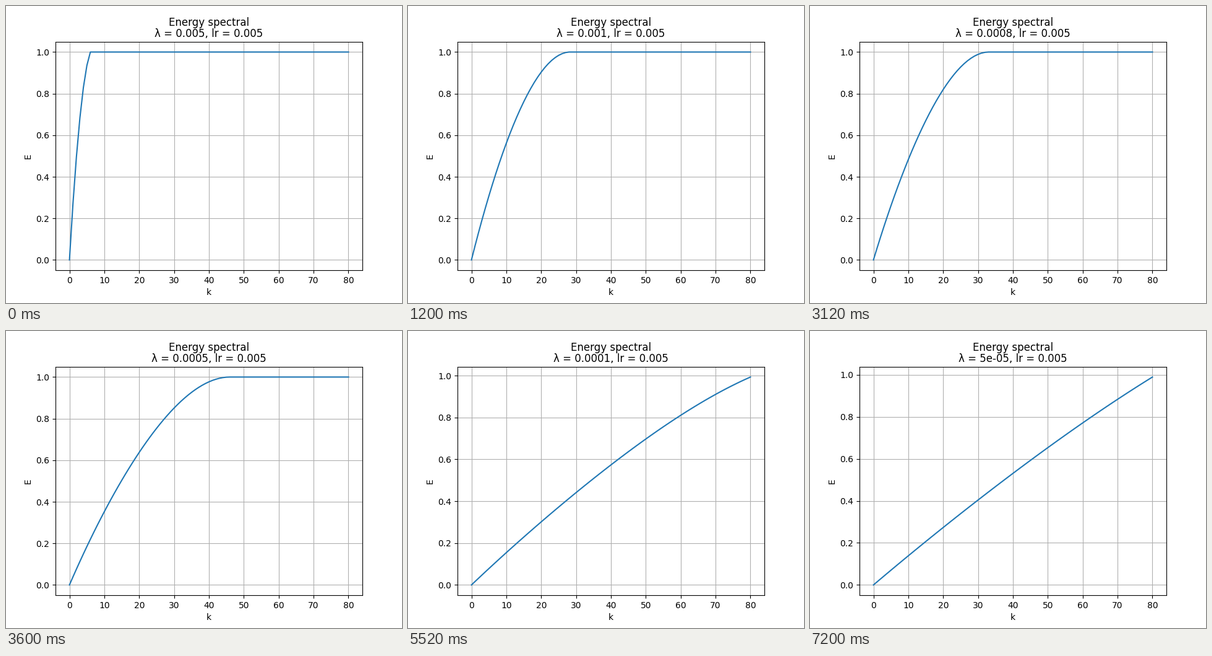
Recreate the animation shown at these times as a matplotlib script. Size 640 px wide and 480 px high, loop 8 s.

```python
import matplotlib.pyplot as plt
import numpy as np
from matplotlib.animation import FuncAnimation

LR = 0.005
TICK_MS = 400
TICKS_PER_CURVE = 3
N_TICKS = 20

# lambda, k where the energy saturates, bend of the rise, late extra bend
CURVES = [
    (0.005, 6, 0.735, 0),
    (0.001, 28, 0.878, 0.095),
    (0.0008, 33, 0.838, 0.155),
    (0.0005, 46, 0.784, 0.215),
    (0.0001, 80.9, 0.282, 0.142),
    (0.00008, 80.93, 0.219, 0.095),
    (0.00005, 81.02, 0.141, 0.034),
]

k = np.arange(81)


def energy(k_sat, bend, late):
    """Straight rise to 1 at k_sat, bowed upwards, then flat."""
    x = np.minimum(k / k_sat, 1)
    return x + x * (1 - x) * (bend + late * x**2)


fig, ax = plt.subplots(figsize=(6.4, 4.8), dpi=100)
line, = ax.plot(k, energy(*CURVES[0][1:]))
ax.set_xlabel("k")
ax.set_ylabel("E")
ax.grid(True)


def update(tick):
    lam, *shape = CURVES[tick // TICKS_PER_CURVE]
    line.set_ydata(energy(*shape))
    ax.relim()
    ax.autoscale_view()
    ax.set_title(f"Energy spectral\nλ = {lam}, lr = {LR}",
                 pad=5.4, linespacing=1)
    return [line]


anim = FuncAnimation(fig, update, frames=N_TICKS, interval=TICK_MS,
                     repeat=True, repeat_delay=0, blit=False)
plt.show()
```
